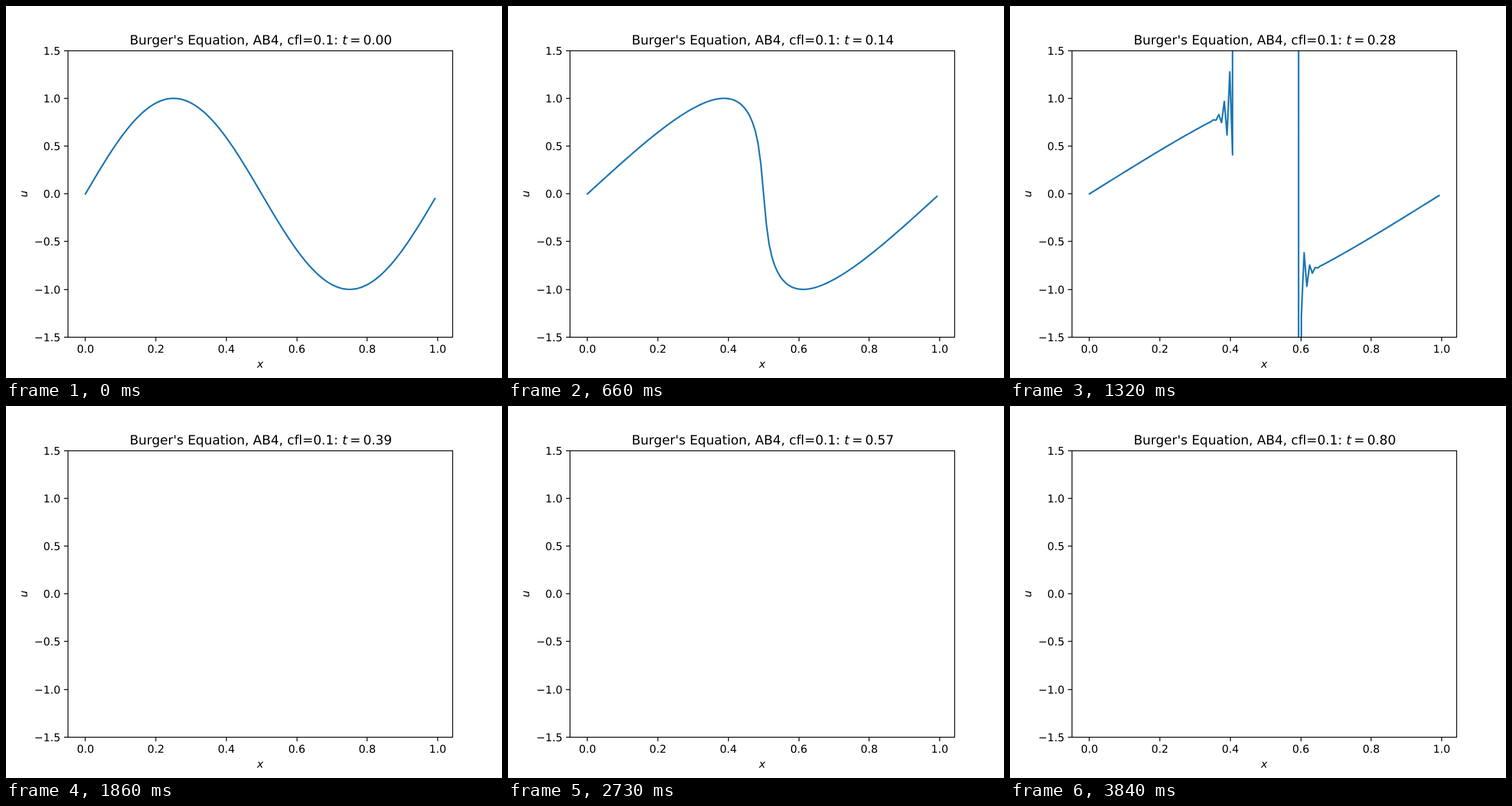
An HTML page for the animation above (3870 ms loop, 864 by 648 pixels).

```html
<!DOCTYPE html>
<html lang="en">
<head>
<meta charset="utf-8">
<title>Burger's Equation</title>
<style>
  html, body { margin: 0; width: 100%; height: 100%; overflow: hidden; background: #fff; }
  svg { display: block; }
  text {
    font: 18.75px "DejaVu Sans", sans-serif;
    font-variant-ligatures: none;
    text-rendering: geometricPrecision;
    white-space: pre;
  }
  .title { font-size: 22.5px; }
  .math { font-style: italic; }
  .axes { fill: none; stroke: #000; stroke-width: 1.5; }
  .curve {
    fill: none; stroke: #1f77b4; stroke-width: 2.8125;
    stroke-linejoin: round; stroke-linecap: square;
  }
</style>
</head>
<body>
<svg width="864" height="648" viewBox="0 0 864 648">
  <clipPath id="box"><rect x="108" y="78" width="670" height="499"/></clipPath>
  <path class="curve" id="curve" clip-path="url(#box)"/>
  <path class="axes" id="axes"/>
  <g id="labels"></g>
  <text class="title" x="215.4" y="67">Burger's Equation, AB4, cfl=0.1: <tspan class="math">t</tspan><tspan dx="4.38">=</tspan><tspan dx="4.38" id="time"></tspan></text>
  <text class="math" x="442.8" y="630" text-anchor="middle">x</text>
  <text class="math" transform="translate(37 327.2) rotate(-90)" text-anchor="middle">u</text>
</svg>
<script>
const $ = id => document.getElementById(id);
const N = 128, DX = 1 / N, DT = 0.1 * DX;
const FRAMES = 129, FRAME_MS = 30, STEPS = 8;
const px = x => 138.436 + 613.52 * x;
const py = u => 327.24 - 166.32 * u;

function drawAxes() {
  let path = 'M108 78H778V577H108Z', labels = '';
  for (let i = 0; i <= 5; i++) {
    const x = px(i / 5);
    path += `M${Math.round(x)} 577v7`;
    labels += `<text x="${x}" y="604" text-anchor="middle">${(i / 5).toFixed(1)}</text>`;
  }
  for (let i = -3; i <= 3; i++) {
    const y = 648 - Math.round(648 - py(i / 2));
    const label = (i / 2).toFixed(1).replace('-', '\u2212');
    path += `M108 ${y}h-7`;
    labels += `<text x="94.9" y="${y + 7}" text-anchor="end">${label}</text>`;
  }
  $('axes').setAttribute('d', path);
  $('labels').innerHTML = labels;
}

// Central differences of u_t = -u u_x on a periodic grid.
const slope = u => u.map((v, i) => -v * (u[(i + 1) % N] - u[(i + N - 1) % N]) / (2 * DX));

// Adams-Bashforth weights, newest slope first, for orders 1 to 4.
const WEIGHTS = [
  [1],
  [3 / 2, -1 / 2],
  [23 / 12, -16 / 12, 5 / 12],
  [55 / 24, -59 / 24, 37 / 24, -9 / 24]
];

function step(u, history) {
  history.unshift(slope(u));
  history.length = Math.min(history.length, 4);
  const w = WEIGHTS[history.length - 1];
  return u.map((v, i) => v + DT * w.reduce((sum, c, k) => sum + c * history[k][i], 0));
}

// Diverging values are cut at |u| = LIMIT, well outside the axes.
const LIMIT = 3;
function curvePath(u) {
  const usable = v => Math.abs(v) < 1e300;
  let path = '', last = '';
  for (let i = 0; i < N - 1; i++) {
    const a = u[i], b = u[i + 1];
    if (!usable(a) || !usable(b)) continue;
    if (Math.min(a, b) > LIMIT || Math.max(a, b) < -LIMIT) continue;
    const point = (v, k) => {
      const c = Math.max(-LIMIT, Math.min(LIMIT, v));
      const x = c === v ? i + k : i + (c - a) / (b - a);
      return px(x * DX).toFixed(3) + ' ' + py(c).toFixed(3);
    };
    const from = point(a, 0), to = point(b, 1);
    path += (from === last ? '' : 'M' + from) + 'L' + to;
    last = to;
  }
  return path;
}

function solve() {
  const paths = [], history = [];
  let u = Array.from({ length: N }, (_, i) => Math.sin(2 * Math.PI * i * DX));
  for (let n = 0; n < FRAMES; n++) {
    paths.push(curvePath(u));
    for (let k = 0; k < STEPS; k++) u = step(u, history);
  }
  return paths;
}

drawAxes();
const paths = solve();

function render() {
  const n = Math.floor(performance.now() / FRAME_MS) % FRAMES;
  $('curve').setAttribute('d', paths[n]);
  $('time').textContent = (n * STEPS * DT + 1e-9).toFixed(2);
  requestAnimationFrame(render);
}
render();
</script>
</body>
</html>
```
